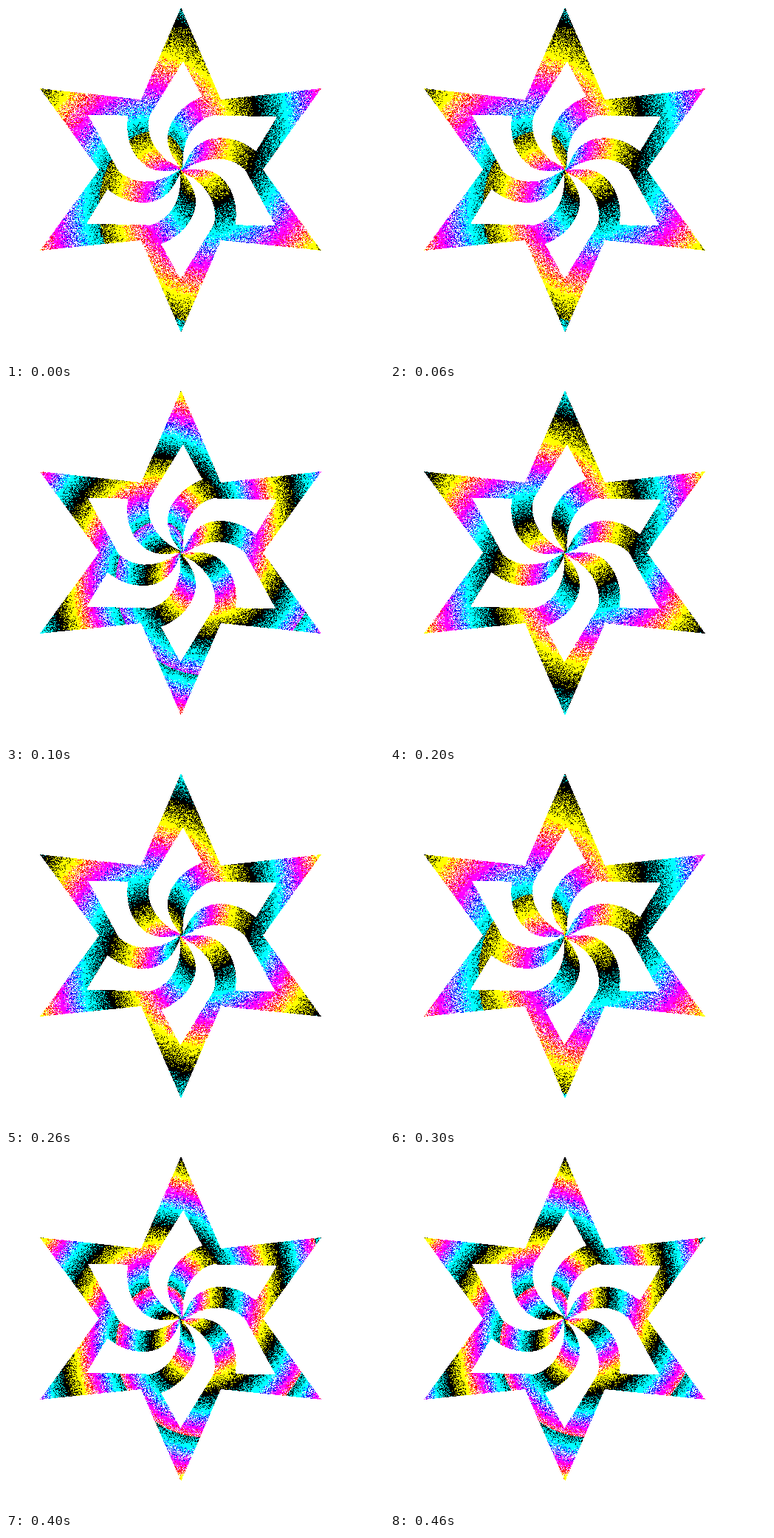
An HTML page with a canvas for the animation above (0.5 s loop, 512x482 px).

```html
<!DOCTYPE html>
<html lang="en">
<head>
<meta charset="utf-8">
<title>Spiral star</title>
<style>
  html, body { margin: 0; width: 100%; height: 100%; overflow: hidden; background: #fff; }
  canvas { display: block; }
</style>
</head>
<body>
<canvas id="stage" width="512" height="482"></canvas>
<script>
const W = 512, H = 482, STEP = 100;
const CX = 236.5, CY = 222.5, SQUASH = 381 / 441, REACH = 200, PITCH = 2150;
const ctx = document.getElementById('stage').getContext('2d', { willReadFrequently: true });

// Colour cycle along the spiral: cyan, black, yellow, magenta.
const cycle = [[0, 1, 1], [0, 0, 0], [1, 1, 0], [1, 0, 1]];

// seam: where the spiral wraps; start: cycle position there; span: colours per turn.
const steps = [
  { seam: 0.58,  start: 1.3,  span: 7.15 },
  { seam: 0.762, start: 3.2,  span: 9.2 },
  { seam: 0.16,  start: 1.05, span: 8 },
  { seam: 0.55,  start: 1.35, span: 6.95 },
  { seam: 0.806, start: 2.5,  span: 10.1 }
];

function starMask() {
  const c = document.createElement('canvas');
  c.width = W;
  c.height = H;
  const g = c.getContext('2d');
  const star = new Path2D('M237 2 291 127 427 112 348 222 427 332 291 318 237 443 183 318 46 332 126 222 46 112 183 127Z');
  const petal = new Path2D('M1.8 -148 L28 -100 C-1 -89 -19 -65 -19 -43 C-19 -28 -11 -15 -1.5 -3 ' +
    'L-3.5 -4 C-31 -18 -45 -39 -45 -61 C-45 -69 -44 -74 -40.5 -79Z');
  g.fill(star);
  g.globalCompositeOperation = 'destination-out';
  g.translate(238, 223);
  for (let i = 0; i < 6; i++) {
    g.fill(petal);
    g.rotate(Math.PI / 3);
  }
  return g.getImageData(0, 0, W, H).data;
}

function random(seed) {
  return () => {
    seed = seed + 0x6D2B79F5 | 0;
    let t = Math.imul(seed ^ seed >>> 15, 1 | seed);
    t = t + Math.imul(t ^ t >>> 7, 61 | t) ^ t;
    return ((t ^ t >>> 14) >>> 0) / 4294967296;
  };
}

const frac = v => v - Math.floor(v);

function paint(mask, { seam, start, span }, seed) {
  const img = new ImageData(W, H), px = img.data, rnd = random(seed);
  px.fill(255);
  for (let y = 0, i = 0; y < H; y++) {
    for (let x = 0; x < W; x++, i += 4) {
      if (mask[i + 3] < 128) continue;
      const dx = x + 0.5 - CX, dy = (y + 0.5 - CY) * SQUASH;
      const turn = frac(Math.atan2(-dx, -dy) / (2 * Math.PI));
      const spiral = turn + (REACH - Math.hypot(dx, dy)) * span / PITCH;
      const pos = start + span * frac(spiral - seam);
      const n = Math.floor(pos), mix = pos - n;
      const from = cycle[n % 4], to = cycle[(n + 1) % 4];
      // One random threshold per pixel turns the blend into grain.
      const limit = rnd();
      for (let k = 0; k < 3; k++) {
        px[i + k] = from[k] + (to[k] - from[k]) * mix > limit ? 255 : 0;
      }
    }
  }
  return img;
}

const mask = starMask();
const pictures = steps.map((s, i) => paint(mask, s, 101 + i * 977));
let shown = -1;

function draw(now) {
  const n = Math.floor(now / STEP) % steps.length;
  if (n !== shown) ctx.putImageData(pictures[shown = n], 0, 0);
  requestAnimationFrame(draw);
}
draw(performance.now());
</script>
</body>
</html>
```
